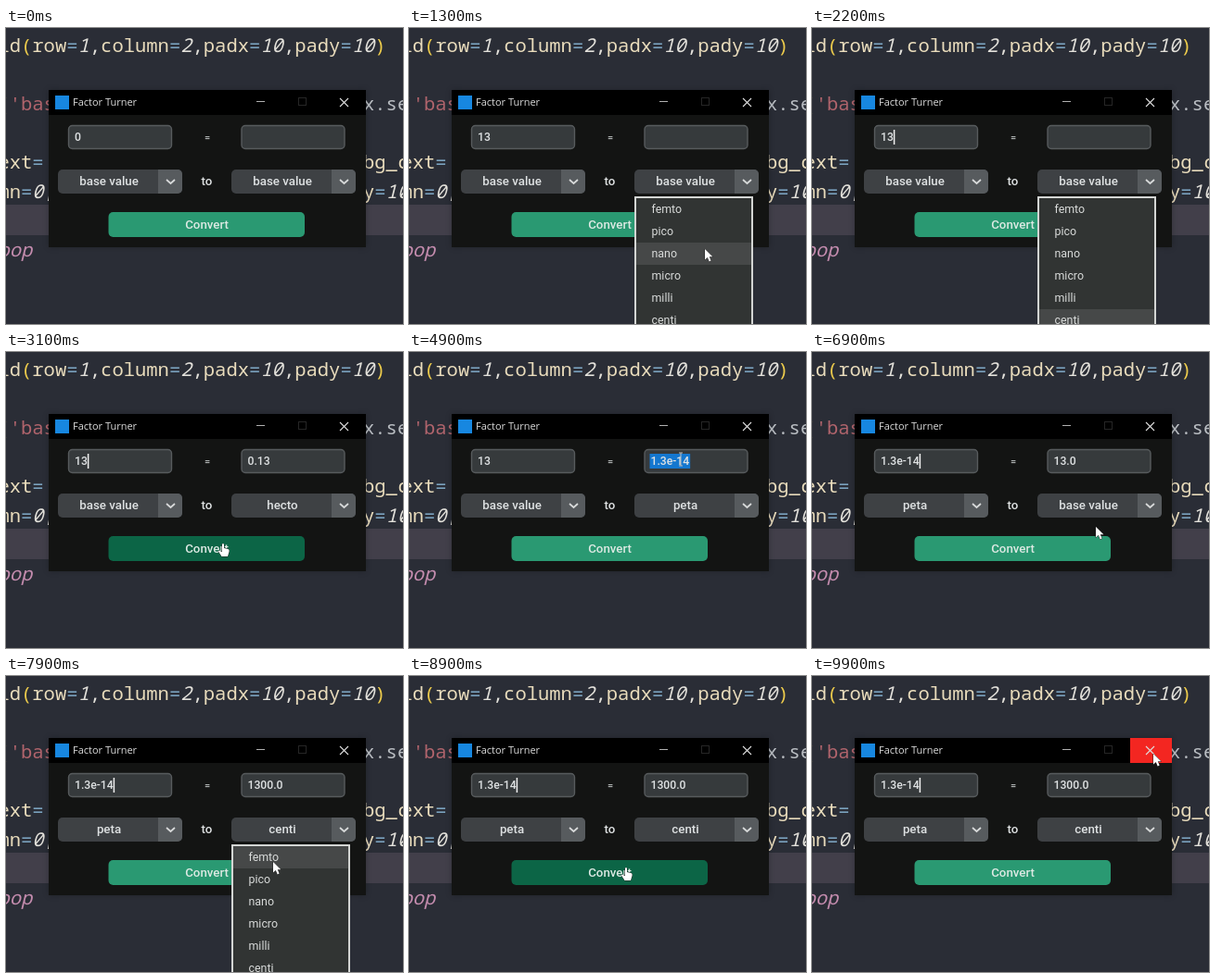
An HTML page with a canvas for the animation above (10 s loop, 428 px wide and 320 px high).

```html
<!DOCTYPE html>
<html lang="en">
<head>
<meta charset="utf-8">
<title>Unit converter</title>
<style>
html, body { margin: 0; width: 100%; height: 100%; overflow: hidden; background: #2a2d36; }
canvas { display: block; }
</style>
</head>
<body>
<canvas id="stage" width="428" height="320"></canvas>
<script>
const ctx = document.getElementById('stage').getContext('2d');
const LOOP = 10000, STEP = 100;
const UNITS = ['femto', 'pico', 'nano', 'micro', 'milli', 'centi'];
const EXPONENT = { centi: -2, 'base value': 0, hecto: 2, peta: 15 };
const BOX = {
  input: [67, 105, 112, 26], output: [253.5, 105, 112, 26],
  from: [56, 153, 134, 26], to: [243, 153, 134, 26],
  convert: [110.5, 199, 211.5, 27], close: [343, 67, 45, 27],
};
const BOLD = '500 13.3px Roboto, sans-serif';
const ENTRY = '500 12.2px Roboto, sans-serif';
const TEXT = '#dfe2e3';

// The session: where the pointer arrives, when, and what changes then.
const steps = [];
const move = (at, x, y, change) => steps.push({ at, x, y, change });

function choose(open, close, side, unit) {
  const x = BOX[side][0] + 55, row = UNITS.indexOf(unit);
  move(open, x + 45, 166, { menu: side });
  move(close - 200, x, row < 0 ? 335 : 197 + row * 24);
  move(close, x, row < 0 ? 335 : 197 + row * 24, { menu: '', [side]: unit });
}

function convert(at) {
  move(at - 100, 234, 207);
  move(at, 234, 207, { convert: true });
}

move(100, 110, 118);
move(300, 112, 118, { input: '1', focus: true });
move(400, 112, 118, { input: '13' });
move(1000, 343, 166, { menu: 'to' });
move(1300, 319, 239);
choose(1301, 2600, 'to', 'hecto');
steps.splice(-3, 1);
convert(3000);
move(3100, 234, 207);
choose(3600, 4000, 'to', 'peta');
convert(4300);
move(4500, 324, 118, { focus: false });
move(4700, 293, 116, { selected: 'output' });
move(4900, 293, 116);
move(5300, 110, 118, { selected: '', focus: true });
move(5500, 12, 118, { selected: 'input' });
move(5600, 12, 118, { selected: '', input: '1.3e-14' });
choose(5900, 6200, 'from', 'peta');
choose(6400, 6600, 'to', 'base value');
convert(6800);
move(6900, 306, 189);
choose(7000, 7400, 'to', 'centi');
convert(7600);
move(7800, 320, 168, { menu: 'to' });
move(7900, 288, 201);
move(8600, 292, 317, { menu: '' });
convert(8900);
choose(9100, 9500, 'to', 'centi');
move(9800, 366, 90);
move(9900, 368, 84);

function result({ input, from, to }) {
  const value = Number((input * 10 ** (EXPONENT[from] - EXPONENT[to])).toPrecision(10));
  return Number.isInteger(value) ? value.toFixed(1) : String(value);
}

function stateAt(t) {
  const state = { input: '0', output: '', from: 'base value', to: 'base value', menu: '', selected: '' };
  for (const { at, change } of steps) {
    if (at > t || !change) continue;
    if (change.convert) state.output = result(state);
    else Object.assign(state, change);
  }
  return state;
}

function pointerAt(t) {
  const next = steps.findIndex(s => s.at > t);
  if (next === 0) return [-99, -99];
  const b = steps.at(next), a = next < 0 ? b : steps[next - 1];
  const k = a === b ? 0 : (t - a.at) / (b.at - a.at), ease = k * k * (3 - 2 * k);
  return [a.x + (b.x - a.x) * ease, a.y + (b.y - a.y) * ease];
}

function rect(x, y, w, h, color) {
  ctx.fillStyle = color;
  ctx.fillRect(x, y, w, h);
}

function roundBox(x, y, w, h, r, fill, stroke) {
  ctx.beginPath();
  ctx.roundRect(x, y, w, h, r);
  ctx.fillStyle = fill;
  ctx.fill();
  if (stroke) { ctx.strokeStyle = stroke; ctx.lineWidth = 1.4; ctx.stroke(); }
}

function label(text, x, y, font, color, align = 'left') {
  ctx.font = font;
  ctx.fillStyle = color;
  ctx.textAlign = align;
  ctx.fillText(text, x, y);
}

function line(points, color, width) {
  ctx.beginPath();
  points.forEach(([x, y]) => ctx.lineTo(x, y));
  ctx.strokeStyle = color;
  ctx.lineWidth = width;
  ctx.stroke();
}

function code(text, column, row, color = '#e9dcbc', italic = false) {
  [...text].forEach((ch, i) => {
    const slant = italic || /\d/.test(ch) ? 'italic ' : '';
    const tint = ch === '=' ? '#7ba3bf' : /[()]/.test(ch) ? '#eccb4c' : /[\d,]/.test(ch) ? '#e2e0da' : color;
    label(ch, -8.6 + (column + i) * 12.3, 26 + row * 31.6, slant + '500 20.5px "Noto Sans Mono", monospace', tint);
  });
}

function drawEditor() {
  rect(0, 0, 428, 320, '#2a2d36');
  rect(0, 191, 428, 33, '#423f4a');
  code('id(row=1,column=2,padx=10,pady=10)', 0, 0);
  code('(', 0, 2);
  code("'bas", 1, 2, '#b0646c');
  code('x.se', 32, 2, '#b9bdc2');
  code('ext=', 0, 4);
  code('bg_c', 32, 4);
  code('mn=0,', 0, 5);
  code('y=10', 32, 5);
  code('oop', 0, 7, '#c48cae', true);
}

function drawFrame(closeHover) {
  ctx.save();
  ctx.shadowColor = 'rgba(0,0,0,.25)';
  ctx.shadowBlur = 6;
  rect(46, 67, 342, 170, '#131413');
  ctx.restore();
  rect(46, 67, 342, 27, '#000');
  rect(53, 73, 15, 15, '#1787e0');
  label('Factor Turner', 72, 84, '11px "Open Sans", sans-serif', '#dcdcdc');
  if (closeHover) rect(...BOX.close, '#f32621');
  line([[270, 79.5], [279, 79.5]], '#b0b0b0', 1);
  ctx.strokeStyle = '#262626';
  ctx.strokeRect(315.5, 75.5, 8, 8);
  line([[360, 76], [369, 85]], '#dedede', 1.1);
  line([[369, 76], [360, 85]], '#dedede', 1.1);
}

function drawEntry([x, y, w, h], text, selected, caret) {
  roundBox(x + .5, y + .5, w - 1, h - 1, 4, '#363a3c', '#575b5d');
  ctx.font = ENTRY;
  const width = ctx.measureText(text).width;
  if (selected) rect(x + 6, y + 5, width + 2, 16, '#1477cf');
  label(text, x + 7, y + 17, ENTRY, TEXT);
  if (caret) rect(x + 7 + width, y + 5, 1.5, 16, '#f0f0f0');
}

function drawOption([x, y, w, h], text) {
  roundBox(x, y, w, h, 5, '#3e4144');
  roundBox(x + 108, y, 26, h, [0, 5, 5, 0], '#575b5e');
  line([[x + 117, y + 11], [x + 121.5, y + 15], [x + 126, y + 11]], '#d8dada', 1.7);
  label(text, x + 55, y + 17, BOLD, TEXT, 'center');
}

function drawMenu(x, py) {
  rect(x, 182, 128, 138, '#d3d5d3');
  rect(x + 2, 184, 124, 136, '#313433');
  UNITS.forEach((unit, i) => {
    const top = 184 + i * 24;
    if (py >= top && py < top + 24) rect(x + 2, top, 124, 24, '#464848');
    label(unit, x + 18.5, top + 16, '12.4px Roboto, sans-serif', '#d9dbda');
  });
}

const POINTERS = {
  arrow: 'M0 0V11.5L2.8 9L4.7 13.5L6.6 12.6L4.8 8.3H8.3Z',
  hand: 'M-1 1Q0-1 1 1V5L5 6Q7 6 6.5 9L5 14H-1.5L-5 8.5Q-4 6.5-2 9L-1 9Z',
  beam: 'M-2-7H2M0-7V7M-2 7H2',
};

function drawPointer(kind, x, y) {
  const shape = new Path2D(POINTERS[kind]);
  ctx.save();
  ctx.translate(x, y);
  ctx.lineWidth = 1;
  ctx.strokeStyle = kind === 'beam' ? '#b9bcbd' : '#222';
  ctx.stroke(shape);
  ctx.fillStyle = '#fff';
  if (kind !== 'beam') ctx.fill(shape);
  ctx.restore();
}

function draw(t) {
  const now = stateAt(t);
  const [px, py] = pointerAt(t);
  const over = name => {
    const [x, y, w, h] = BOX[name];
    return px >= x && px < x + w && py >= y && py < y + h;
  };
  const menuX = now.menu && BOX[now.menu][0];
  const overMenu = now.menu && px >= menuX && px < menuX + 128 && py >= 182;
  const overButton = !overMenu && over('convert');
  const caret = now.focus && (t + 300) % 1000 < 600;

  drawEditor();
  drawFrame(over('close'));
  for (const name of ['input', 'output']) {
    drawEntry(BOX[name], now[name], now.selected === name, caret && name === 'input');
  }
  for (const name of ['from', 'to']) drawOption(BOX[name], now[name]);
  label('=', 217, 122, '500 11px Roboto, sans-serif', '#b4b8b8', 'center');
  label('to', 216.5, 170, BOLD, TEXT, 'center');
  roundBox(...BOX.convert, 5, overButton ? '#0c6546' : '#2a9972');
  label('Convert', 216.5, 217, BOLD, '#dce9e3', 'center');
  if (now.menu) drawMenu(menuX, overMenu ? py : -1);

  const overEntry = over('input') || over('output');
  const clickable = overButton || over('from') || over('to');
  drawPointer(overEntry ? 'beam' : clickable ? 'hand' : 'arrow', px, py);
}

function tick() {
  draw(Math.floor(performance.now() % LOOP / STEP) * STEP);
  requestAnimationFrame(tick);
}
tick();
</script>
</body>
</html>
```
